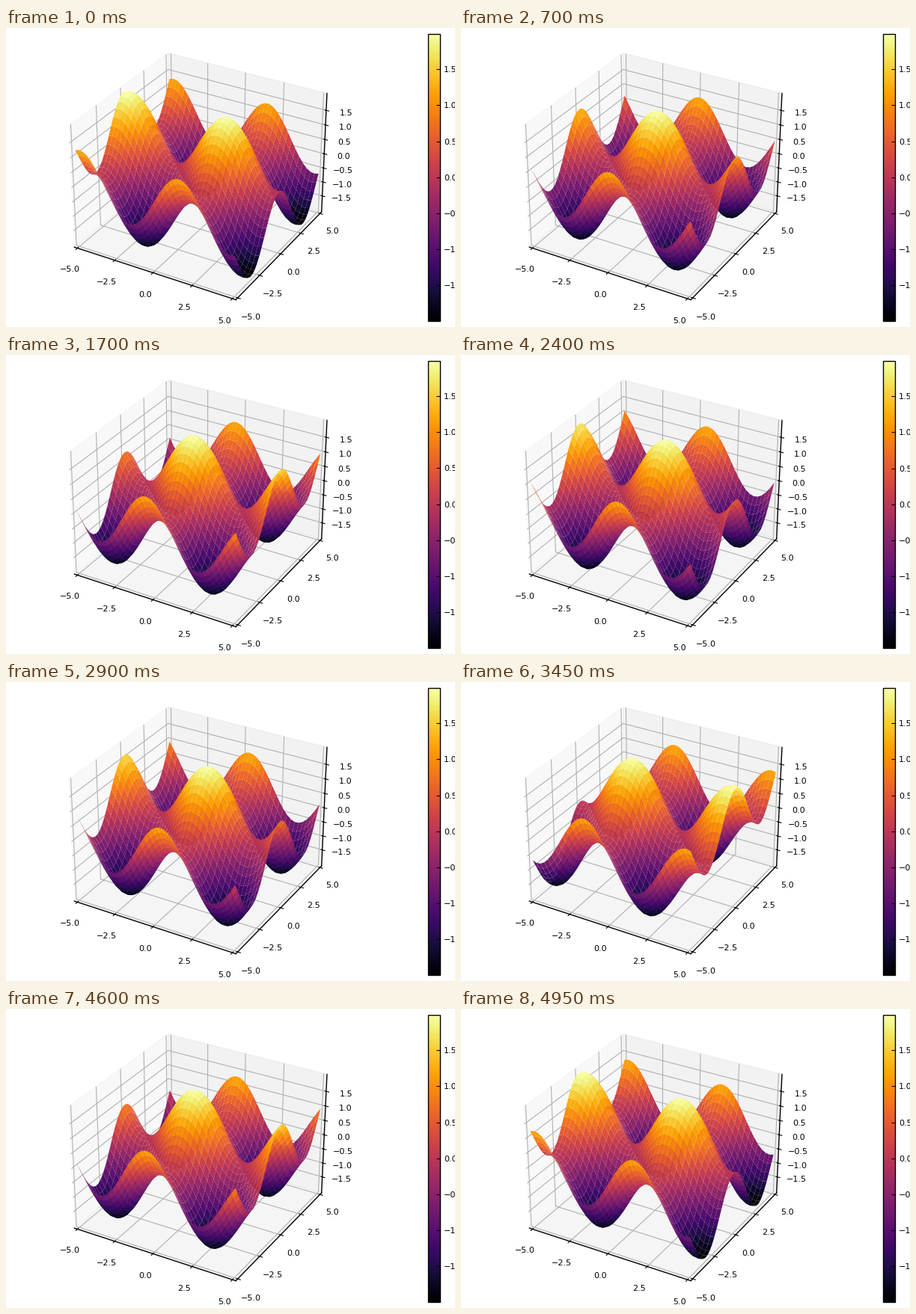
Write a matplotlib script that moves like this. It is 600 px wide and 400 px high and loops after 5000 ms.

```python
import numpy as np
import matplotlib.pyplot as plt
from matplotlib.animation import FuncAnimation
from matplotlib.cm import ScalarMappable
from matplotlib.ticker import MultipleLocator

W, H, DPI = 600, 400, 100
FRAMES, INTERVAL = 100, 50
CMAP = "inferno"

plt.rcParams.update({"font.family": "DejaVu Sans", "font.size": 8,
                     "axes.linewidth": 1.0})

fig = plt.figure(figsize=(W / DPI, H / DPI), dpi=DPI, facecolor="white")


def pixel_box(left, top, width, height):
    """Figure fractions of a box given in pixels from the top left."""
    return [left / W, 1 - (top + height) / H, width / W, height / H]


def padded(lo, hi):
    pad = (hi - lo) / 48
    return lo - pad, hi + pad


def lowered(value, _pos):
    """Tick label under an empty line, which drops it by the descent."""
    return f"\n{value:.1f}".replace("-", "\N{MINUS SIGN}")


ax = fig.add_axes(pixel_box(62.4, 3.8, 384, 384), projection="3d")
ax.patch.set_visible(False)
ax.view_init(elev=30, azim=-60)
ax.set(xlim=padded(-5, 5), ylim=padded(-5, 5), zlim=padded(-2, 2))
ax.set_xticks(np.linspace(-5, 5, 5))
ax.set_yticks(np.linspace(-5, 5, 5))
ax.set_zticks(np.linspace(-1.5, 1.5, 7))
for axis in (ax.xaxis, ax.yaxis, ax.zaxis):
    axis.set_major_formatter(lowered)
    for label in axis.get_ticklabels():
        label.set_linespacing(0)

scale = ScalarMappable(cmap=CMAP)
scale.set_clim(-2, 2)
bar = fig.add_axes(pixel_box(564, 8, 16, 384))
fig.colorbar(scale, cax=bar, ticks=MultipleLocator(0.5))
bar.tick_params(axis="y", direction="in", left=True)

grid = np.linspace(-5, 5, 40)
X, Y = np.meshgrid(grid, grid)
surface = None


def draw(k):
    global surface
    if surface is not None:
        surface.remove()
    phase = 10 * np.sin(2 * np.pi * k / (FRAMES - 1))
    Z = np.sin(X + phase) + np.cos(Y)
    lo, hi = Z.min(), Z.max()
    surface = ax.plot_surface(X, Y, Z, rstride=1, cstride=1, cmap=CMAP,
                              vmin=lo, vmax=hi)
    ax.set_zlim(*padded(lo, hi))
    scale.set_clim(lo, hi)
    return ()


anim = FuncAnimation(fig, draw, frames=FRAMES, interval=INTERVAL,
                     init_func=lambda: (), repeat=True, repeat_delay=0)
plt.show()
```
